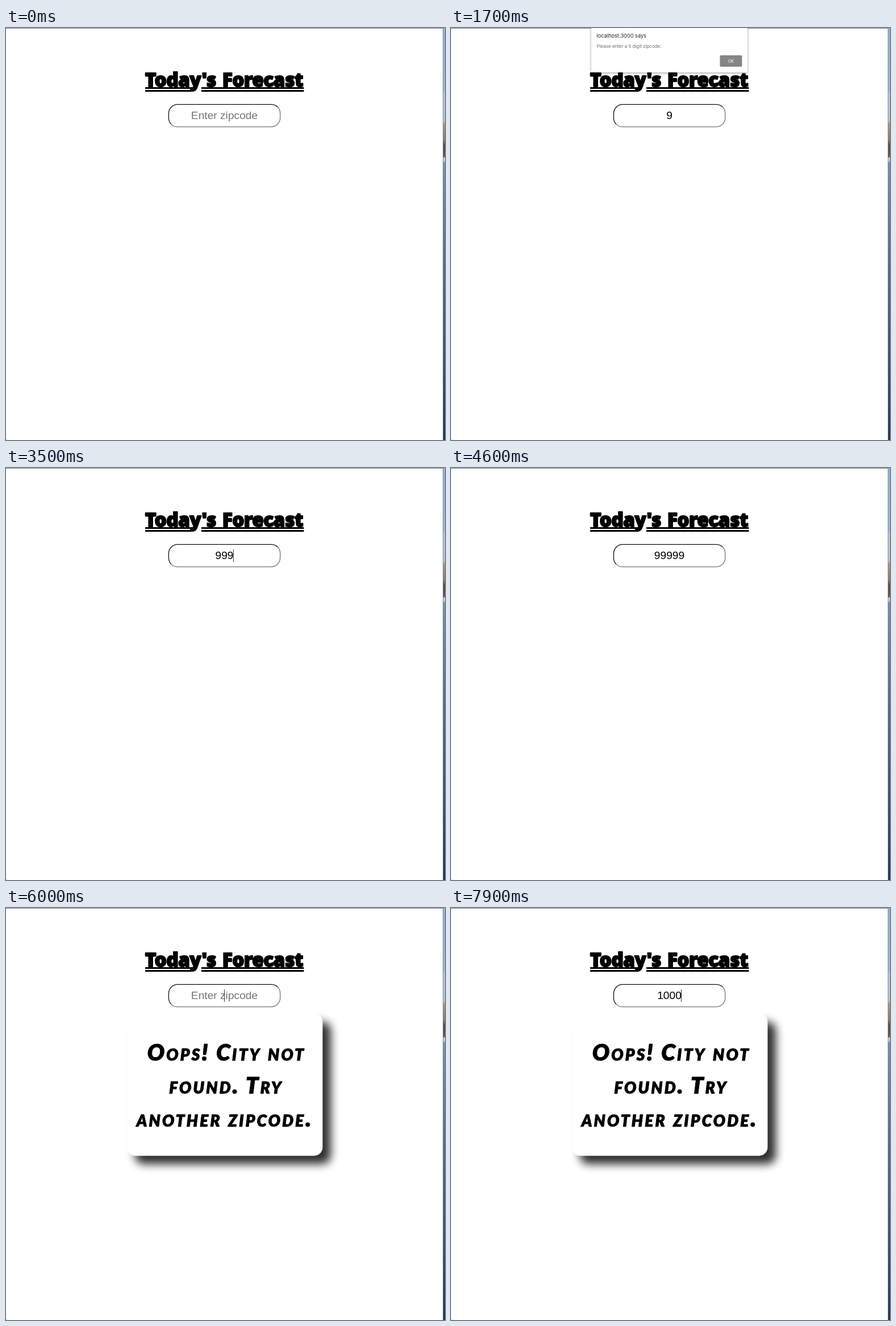
An HTML page that plays this animation: 773x724 px, repeating every 8 s.

```html
<!DOCTYPE html>
<html lang="en">
<head>
<meta charset="utf-8">
<title>Forecast form</title>
<style>
  html, body { margin: 0; width: 100%; height: 100%; overflow: hidden; background: #fff; }
  svg { position: absolute; left: 0; top: 0; display: block; }
  #alert { transform-origin: 384.5px 66px; font-family: Inter, Roboto, sans-serif; }
  #panel { filter: drop-shadow(0 1px 2px rgba(0, 0, 0, .4)); }
  .title { font: 800 33px "Open Sans", sans-serif; letter-spacing: -.4px; text-anchor: middle;
           stroke: #000; stroke-width: 2.2; stroke-linejoin: round; }
  .field { font: 19.2px "Liberation Sans", Arial, sans-serif; text-anchor: middle; }
  .note { font: italic 900 40px Lato, sans-serif; font-variant: small-caps; letter-spacing: 3.2px;
          text-anchor: middle; stroke: #000; stroke-width: 1; stroke-linejoin: round; }
</style>
</head>
<body>
<svg width="773" height="724" viewBox="0 0 773 724">
  <defs>
    <linearGradient id="view" x1="0" y1="0" x2="0" y2="724" gradientUnits="userSpaceOnUse">
      <stop offset="0" stop-color="#8fb3dc"/>
      <stop offset=".153" stop-color="#9ab8d8"/>
      <stop offset=".156" stop-color="#b4c5da"/>
      <stop offset=".226" stop-color="#b9c3d0"/>
      <stop offset=".232" stop-color="#b4937b"/>
      <stop offset=".27" stop-color="#9a7c68"/>
      <stop offset=".285" stop-color="#59493f"/>
      <stop offset=".312" stop-color="#62554e"/>
      <stop offset=".316" stop-color="#cfcfce"/>
      <stop offset=".323" stop-color="#c4c8cc"/>
      <stop offset=".327" stop-color="#7390ae"/>
      <stop offset=".6" stop-color="#4e698c"/>
      <stop offset=".82" stop-color="#334e72"/>
      <stop offset="1" stop-color="#1c3257"/>
    </linearGradient>
    <filter id="blur" x="-20%" y="-20%" width="140%" height="140%">
      <feGaussianBlur stdDeviation="8"/>
    </filter>
  </defs>

  <rect width="773" height="724" fill="#fff"/>
  <rect x="770" width="3" height="724" fill="url(#view)"/>
  <rect x="769" width="1" height="724" fill="#8a8f96"/>
  <rect width="770" height="1" fill="#7d7d7d"/>
  <path d="M0 722.5L1.5 724H0Z" fill="#888"/>

  <g class="title">
    <text x="307.5" y="102.5">Today's</text>
    <text x="452" y="102.5">Forecast</text>
  </g>
  <path d="M245 105.5H329M344 105.5H524.5M245 110.5H329M344 110.5H524.5" stroke="#000" stroke-width="3"/>

  <g fill="none" stroke-width="1.3">
    <path d="M478.3 138.7A16 16 0 0 1 482.8 150V158A16 16 0 0 1 467 173.7H302A16 16 0 0 1 290.9 169.1" stroke="#767676"/>
    <path d="M290.9 169.1A16 16 0 0 1 286.4 158V150A16 16 0 0 1 302 134.3H467A16 16 0 0 1 478.3 138.7" stroke="#111"/>
  </g>
  <text id="entry" class="field" x="384.5" y="160"></text>
  <rect id="caret" y="143" width="1" height="22" fill="#333"/>

  <g id="card">
    <rect x="227" y="200" width="345" height="250" rx="15" opacity=".82" filter="url(#blur)"/>
    <rect x="212.5" y="185" width="345" height="250.4" rx="15" fill="#fff"/>
    <g class="note">
      <text x="388" y="268">Oops! City not</text>
      <text x="387.5" y="326">found. Try</text>
      <text x="385" y="384">another zipcode.</text>
    </g>
  </g>
</svg>

<svg id="alert" width="773" height="90" viewBox="0 0 773 90">
  <rect id="panel" x="247" y="-10" width="275" height="88" rx="3" fill="#fff"/>
  <text x="256.5" y="16.5" font-size="9.2" fill="#202124">localhost:3000 says</text>
  <text x="256.5" y="35" font-size="8" fill="#6a6c70">Please enter a 5 digit zipcode.</text>
  <rect x="473.5" y="48" width="39" height="20" rx="2" fill="#858585"/>
  <text x="493" y="60.6" font-size="7.4" fill="#fff" text-anchor="middle">OK</text>
</svg>

<script>
const LOOP = 8000, MID = 384.5, DIGIT = 5.34;
const $ = id => document.getElementById(id);
const entry = $('entry'), caret = $('caret'), card = $('card'), alertBox = $('alert');

// [start ms, typed digits, caret shown]
const typing = [
  [0, '', 0], [200, '', 1], [700, '', 0],
  [900, '9', 1], [1400, '9', 0], [2700, '9', 1],
  [3200, '99', 1], [3500, '999', 1], [3700, '9999', 1],
  [4200, '99999', 1], [4600, '99999', 0],
  [5000, '', 1], [5500, '', 0], [6000, '', 1], [6500, '', 0],
  [6600, '1', 1], [7100, '1', 0], [7200, '10', 1], [7300, '100', 1], [7500, '1000', 1]
];

// [start ms, opacity, shift, tilt in degrees]
const popup = [
  [0, 0, 0, 0],
  [1500, .1, -11.5, 5], [1600, .65, -4, 2.3], [1700, 1, 0, 0],
  [2500, .7, -3.5, 2.1], [2600, .2, -9.5, 4.3], [2700, 0, 0, 0]
];

const at = (steps, t) => steps.findLast(s => s[0] <= t);
const show = (el, on) => el.setAttribute('visibility', on ? 'visible' : 'hidden');

function draw(t) {
  const [, digits, blink] = at(typing, t);
  entry.textContent = digits || 'Enter zipcode';
  entry.setAttribute('fill', digits ? '#000' : '#757575');
  caret.setAttribute('x', Math.floor(MID + DIGIT * digits.length));
  show(caret, blink);
  show(card, t >= 5000);

  const [, alpha, shift, tilt] = at(popup, t);
  alertBox.style.opacity = alpha;
  alertBox.style.transform = tilt
    ? `translateY(${shift}px) perspective(100px) rotateX(${tilt}deg)` : 'none';
}

const start = performance.now();
function tick() {
  draw((performance.now() - start) % LOOP);
  requestAnimationFrame(tick);
}
draw(0);
tick();
</script>
</body>
</html>
```
